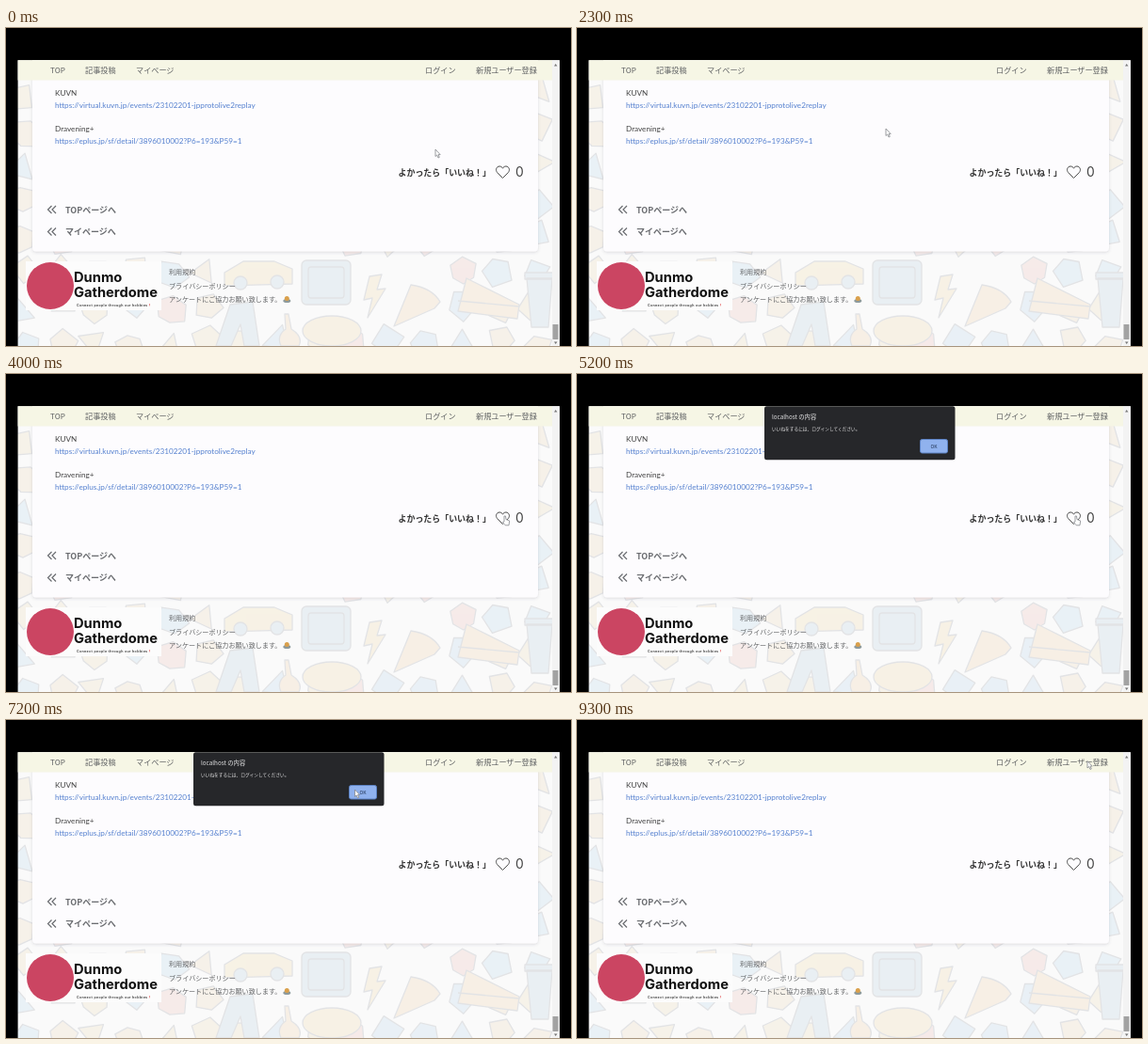
Write an HTML page that moves like this. It is 600 px wide and 338 px high and loops after 9400 ms.

```html
<!DOCTYPE html>
<html lang="ja">
<head>
<meta charset="utf-8">
<title>Like button demo</title>
<style>
  html, body { margin: 0; width: 100%; height: 100%; overflow: hidden; background: #000; }
  svg { display: block; width: 100vw; height: 100vh; }
  text { font-family: "Noto Sans CJK JP", "Noto Sans CJK", sans-serif; fill: #606264; white-space: pre; }
  .nav text { font-size: 8.15px; font-weight: 500; }
  .body text { font-family: Lato, sans-serif; font-size: 8.18px; fill: #444; }
  .body .link { fill: #5580cf; }
  .like { font-size: 8.95px; font-weight: 700; fill: #333; }
  .count { font-family: Inter, sans-serif; font-size: 13.8px; fill: #444; }
  .back text { font-size: 9px; font-weight: 700; fill: #6a6c70; }
  .foot text { font-size: 7.1px; font-weight: 500; }
  .brand text { font-family: Inter, sans-serif; font-weight: 700; font-size: 14.7px; fill: #111; }
  .brand .tag { font-size: 3.5px; letter-spacing: .38px; fill: #444; }
  #dialog text { fill: #e8e8e9; }
  #doodles { opacity: .13; stroke: #4b5160; stroke-width: 1.3; stroke-linejoin: round; }
</style>
</head>
<body>
<svg viewBox="0 0 600 338">
  <defs>
    <filter id="shadow" x="-5%" y="-5%" width="110%" height="115%">
      <feDropShadow dx="0" dy="1" stdDeviation="1.8" flood-color="#556" flood-opacity=".2"/>
    </filter>
    <clipPath id="page"><rect x="12.6" y="34.3" width="575.2" height="304"/></clipPath>
    <path id="chevrons" d="M4 -4 0 0 4 4M8.500 -4 4.500 0 8.500 4" fill="none" stroke="#6a6c70" stroke-width="1.2"/>
  </defs>
  <rect width="600" height="338"/>
  <g clip-path="url(#page)">
    <rect width="600" height="338" fill="#fafafa"/>
    <g id="doodles">
      <g id="scatter"></g>
      <g fill="#e9bd5c">
        <path d="M232 274V260L252 248H285L304 256V272Z"/>
        <path d="M386 264 399 262 394 278 403 277 384 308 389 287 380 289Z"/>
        <ellipse cx="346" cy="322" rx="31" ry="16"/>
      </g>
      <g fill="#7fabc6">
        <circle cx="249" cy="271" r="7"/>
        <circle cx="288" cy="270" r="7"/>
        <rect x="314" y="247" width="52" height="47" rx="5"/>
        <rect x="321" y="254" width="38" height="33" rx="3"/>
        <path d="M553 266H580L576 318H558ZM551 260H582V267H551Z"/>
        <path d="M238 294 262 291 269 338H253L249 315 239 338H223Z"/>
      </g>
      <g fill="#e6ac60">
        <path d="M430 273Q452 276 461 291L455 298 412 317Z"/>
        <path d="M489 266 545 294 543 309 480 301ZM480 290 545 296"/>
        <path d="M296 304H300L303 320Q316 328 311 338H292Q287 327 297 320Z"/>
      </g>
    </g>
    <rect x="28" y="30" width="537" height="207.5" rx="4" fill="#fdfcfe" filter="url(#shadow)"/>
    <rect x="12" y="34" width="568" height="21.5" fill="#f6f6e5"/>

    <g class="nav">
      <text x="47" y="47.8">TOP</text>
      <text x="84" y="47.8">記事投稿</text>
      <text x="138" y="47.8">マイページ</text>
      <text x="445" y="47.8">ログイン</text>
      <text x="499" y="47.8">新規ユーザー登録</text>
    </g>

    <g class="body">
      <text x="52" y="72.3">KUVN</text>
      <text x="52" y="85" class="link">https://virtual.kuvn.jp/events/23102201-jpprotolive2replay</text>
      <text x="52" y="110">Dravening+</text>
      <text x="52" y="122.5" class="link">https://eplus.jp/sf/detail/3896010002?P6=193&amp;P59=1</text>
    </g>

    <text x="416.5" y="156.8" class="like">よかったら「いいね！」</text>
    <path transform="translate(527.5 153)" d="M0 6.500-5.800.6C-8.200-2.200-6.600-6-3.400-6-1.700-6-.5-5 0-3.800.5-5 1.700-6 3.400-6 6.600-6 8.200-2.200 5.800.6Z" fill="#fdfcfe" stroke="#4a4a4a" stroke-linejoin="round"/>
    <text x="541" y="158" class="count">0</text>

    <g class="back">
      <use href="#chevrons" x="44.5" y="193"/>
      <use href="#chevrons" x="44.5" y="216.5"/>
      <text x="63" y="196.8">TOPページへ</text>
      <text x="63" y="219.8">マイページへ</text>
    </g>

    <g class="brand">
      <rect x="21" y="248" width="144" height="52" fill="#fcfcfc"/>
      <circle cx="47" cy="274" r="25" fill="#cb4562"/>
      <text x="72" y="270">Dunmo</text>
      <text x="72" y="285.5">Gatherdome</text>
      <text x="75" y="296.3" class="tag">Connect people through our hobbies <tspan fill="#d33">!</tspan></text>
    </g>

    <g class="foot">
      <text x="173" y="262">利用規約</text>
      <text x="173" y="276.5">プライバシーポリシー</text>
      <text x="173" y="291">アンケートにご協力お願い致します。</text>
      <ellipse cx="298.3" cy="290" rx="4" ry="2" fill="#8d9a9c"/>
      <circle cx="298.3" cy="287.5" r="2.5" fill="#d9a04c"/>
    </g>

    <rect x="580" y="34" width="8" height="304" fill="#f3f3f3"/>
    <rect x="580.5" y="315" width="6" height="16" fill="#a3a3a3"/>
    <path d="M582 40.500H585.400L583.700 38ZM582 333.500H585.400L583.700 336Z" fill="#777"/>
  </g>

  <g id="dialog">
    <rect x="199" y="34.3" width="202.5" height="57" rx="2.5" fill="#26272a"/>
    <text x="207" y="47.5" font-size="6.3">localhost の内容</text>
    <text x="207" y="60" font-size="4.7">いいねをするには、ログインしてください。</text>
    <rect x="364.5" y="69.5" width="29" height="14.5" rx="2" fill="#90b2ee" stroke="#5d83c4"/>
    <text x="379" y="78.8" font-size="5" text-anchor="middle" style="fill:#1d3050">OK</text>
  </g>

  <g id="cursor" fill="#fff" stroke="#85878c" stroke-width=".8" stroke-linejoin="round">
    <path id="arrow" d="M0 0V7.500L1.700 6 3 9 4.300 8.400 3 5.600H5.200Z"/>
    <path id="hand" d="M0 0H1.500L2 3.600 5.700 5 5 9.800H1.200L-1.600 6.500 0 6Z"/>
  </g>
</svg>
<script>
  const LOOP = 9400, STEP = 100, MOVE = 500;
  const byId = id => document.getElementById(id);

  let seed = 7;
  const random = () => (seed = seed * 16807 % 2147483647) / 2147483647;

  // Rounded, wobbly snack shapes on a loose grid
  function snack(x, y) {
    const sides = 3 + Math.floor(random() * 4), turn = random() * Math.PI;
    const points = Array.from({ length: sides }, (_, i) => {
      const angle = turn + i * 2 * Math.PI / sides, r = 12 + random() * 7;
      return [x + r * Math.cos(angle), y + r * Math.sin(angle)].map(v => v.toFixed(1));
    });
    const hue = [35, 8, 205, 42][Math.floor(random() * 4)];
    return `<polygon points="${points.join(" ")}" fill="hsl(${hue} 60% 68%)"/>`;
  }
  const inKeyArt = (x, y) => y > 232 && x > 220 && x < 470 && y < 320;
  let snacks = "";
  for (let y = 70; y < 345; y += 38)
    for (let x = 18; x < 600; x += 39)
      if (!inKeyArt(x, y)) snacks += snack(x + random() * 8 - 4, y + random() * 10 - 5);
  byId("scatter").innerHTML = snacks;

  // Each move: start time, then where the pointer ends up
  const home = [456, 129];
  const moves = [
    [1200, 380, 93], [1700, 328, 107], [2600, 392, 146],
    [3300, 529, 151], [6400, 370.5, 74], [8300, 542, 43.5]
  ];
  const within = (t, from, to) => t >= from && t < to;
  const show = (id, on) => byId(id).setAttribute("visibility", on ? "visible" : "hidden");

  const pointerAt = t => moves.reduce(([x, y], [start, toX, toY]) => {
    const k = Math.min(Math.max((t - start) / MOVE, 0), 1), ease = k * k * (3 - 2 * k);
    return [x + (toX - x) * ease, y + (toY - y) * ease];
  }, home);

  function draw() {
    const t = Math.floor(performance.now() % LOOP / STEP) * STEP;
    const hand = within(t, 3800, 6400);
    byId("cursor").setAttribute("transform", `translate(${pointerAt(t)})`);
    show("arrow", !hand);
    show("hand", hand);
    show("dialog", within(t, 4700, 7600));
    requestAnimationFrame(draw);
  }
  draw();
</script>
</body>
</html>
```
